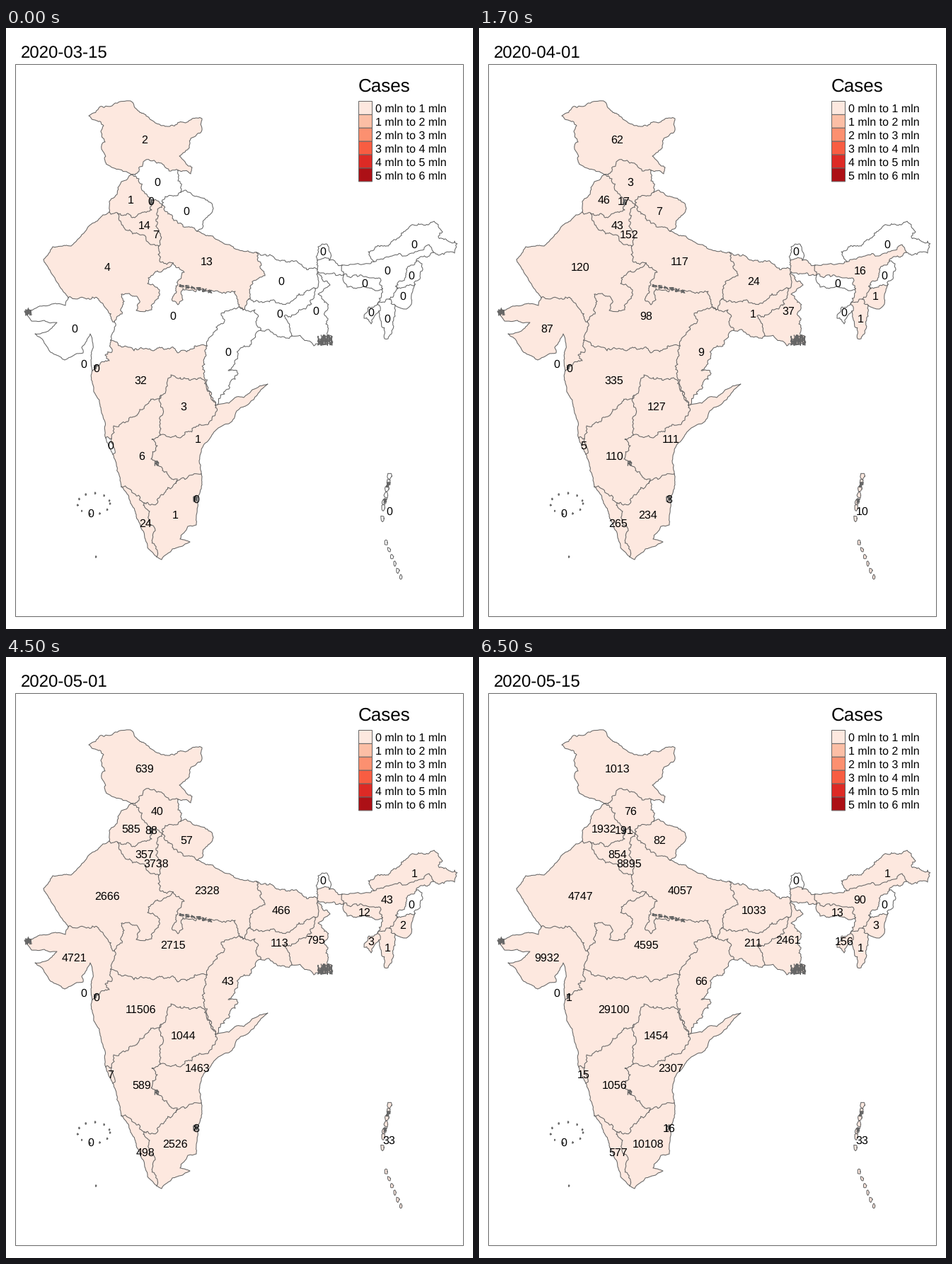
Animation, 660 px wide and 849 px high, one loop 8000 ms. Source, as a matplotlib script:

```python
import math
import numpy as np
import matplotlib.pyplot as plt
from matplotlib.animation import FuncAnimation
from matplotlib.patches import Polygon, Rectangle

W, H, DPI = 660, 849, 100
PX = 72 / DPI
LINE, PINK = "#666666", "#FDE8DF"
REDS = [PINK, "#FCBEA5", "#FC9070", "#F85D42", "#DD2A25", "#AC1016"]
DATES = ["2020-03-15", "2020-04-01", "2020-04-15", "2020-05-01", "2020-05-15"]
STEPS_PER_DATE = 4  # half-second steps; the loop opens on the last one of a date
COAST, RIDGE, BORDER = 0.06, 0.12, 0.2  # raggedness of a line

plt.rcParams.update({"font.family": "Liberation Sans", "text.hinting": "none",
                     "text.hinting_factor": 1})
rng = np.random.default_rng(7)
fig = plt.figure(figsize=(W / DPI, H / DPI), dpi=DPI, facecolor="white")
ax = fig.add_axes([0, 0, 1, 1])
ax.set(xlim=(0, W), ylim=(H, 0))
ax.axis("off")

arcs, states = {}, []


def roughen(p, q, rough):
    """Midpoint displacement of one segment, without its end point."""
    dx, dy = q[0] - p[0], q[1] - p[1]
    length = math.hypot(dx, dy)
    if length < 3:
        return [p]
    limit = min(0.35, 2.5 / length)
    k = np.clip(rng.normal(0, rough), -limit, limit)
    mid = ((p[0] + q[0]) / 2 - dy * k, (p[1] + q[1]) / 2 + dx * k)
    return roughen(p, mid, rough) + roughen(mid, q, rough)


def arc(name, rough, *points):
    line = [r for p, q in zip(points, points[1:]) for r in roughen(p, q, rough)]
    arcs[name] = line + [points[-1]]
    ax.plot(*zip(*arcs[name]), color=LINE, lw=1.05 * PX, zorder=3,
            solid_joinstyle="round")


def ring(names):
    """Join arcs end to end, flipping each one where needed."""
    parts = [arcs[n] for n in names.split()]
    pts = list(parts[0])
    if len(parts) > 1:
        gap = lambda p: min(math.dist(p, parts[1][i]) for i in (0, -1))
        if gap(pts[0]) < gap(pts[-1]):
            pts.reverse()
    for part in parts[1:]:
        flip = math.dist(pts[-1], part[-1]) < math.dist(pts[-1], part[0])
        pts += part[::-1] if flip else part
    return pts


def label(x, y, size, text="", ha="left"):
    return ax.text(x, y, text, size=size * PX, ha=ha, va="baseline", zorder=6)


def state(x, y, counts, *rings):
    patches = [ax.add_patch(Polygon(ring(r), ec="none", zorder=1)) for r in rings]
    states.append((counts.split(), patches, label(x, y + 5.6, 15.7, ha="center")))


def islands(prefix, centers, size):
    """Small irregular blobs, taller than wide; returns their arc names."""
    for i, (x, y) in enumerate(centers):
        r = size * rng.uniform(0.6, 1.1, 9)
        r[-1] = r[0]
        t = np.linspace(0, 2 * math.pi, 9)
        arc(f"{prefix}{i}", COAST, *zip(x + 0.6 * r * np.cos(t), y + r * np.sin(t)))
    return [f"{prefix}{i}" for i in range(len(centers))]


def scribble(x, y, w, h):
    """Dense tangle of creeks or tiny enclaves."""
    n = int(8 + w * h / 4)
    ax.plot(x + w * rng.uniform(-0.5, 0.5, n), y + h * rng.uniform(-0.5, 0.5, n),
            color=LINE, lw=PX, zorder=3)


# Points where three borders, or a border and the outline, meet
JK_W, JK_E, HP_PB, HP_UK = (179, 207), (243, 201), (204, 241), (247, 232)
UK_HR, UK_UP, PB_HR, PB_RJ = (221, 250), (270, 287), (158, 262), (146, 260)
HR_UP, UP_MP, UP_BR, BR_JH = (216, 308), (236, 332), (354, 317), (343, 383)
UP_CG, RJ_GJ, GJ_RJ, GJ_MH = (335, 398), (88, 381), (153, 415), (148, 441)
MH_GJ, MP_CG, CG_TG, MH_KA = (122, 484), (284, 449), (296, 533), (219, 519)
GA_MH, GA_IN, GA_KA, KA_AP = (141, 579), (149, 580), (151, 602), (218, 575)
AP_TN, TN_AP, KA_KL, KA_TN = (240, 643), (276, 630), (163, 648), (195, 671)
CAPE, CG_JH, JH_SEA, BR_WB = (213, 747), (360, 427), (404, 435), (437, 368)
WB_BR, SK_W, SK_E, WB_AS = (440, 341), (440, 328), (457, 328), (475, 335)
ML_W, ML_E, AS_AR, AR_AS = (477, 349), (532, 368), (520, 330), (604, 317)
NL_N, NL_MN, MN_E, MN_MZ = (580, 329), (551, 365), (578, 362), (550, 392)
MZ_N, TR_N, TR_MZ = (542, 383), (527, 387), (527, 400)

# North
arc("jk_out", RIDGE, JK_W, (143, 193), (135, 171), (140, 161), (134, 146), (138, 138),
    (117, 124), (133, 111), (176, 103), (185, 115), (225, 139), (250, 133), (277, 128),
    (277, 144), (261, 156), (260, 163), (245, 181), (263, 197), (261, 206), JK_E)
arc("jk_hp", BORDER, JK_W, (194, 189), (213, 191), JK_E)
arc("hp_out", BORDER, JK_E, (243, 216), HP_UK)
arc("hp_uk", BORDER, HP_UK, (225, 238), UK_HR)
arc("hp_hr", BORDER, HP_PB, UK_HR)
arc("hp_pb", BORDER, JK_W, (188, 213), (192, 229), HP_PB)
arc("pb_out", RIDGE, JK_W, (163, 217), (157, 235), (149, 241), PB_RJ)
arc("pb_rj", BORDER, PB_RJ, PB_HR)
arc("pb_hr", BORDER, PB_HR, (182, 268), (206, 257), HP_PB)
arc("hr_rj", BORDER, PB_HR, (160, 272), (179, 291), (193, 292), (207, 306), HR_UP)
arc("hr_up", BORDER, UK_HR, (212, 270), HR_UP)
arc("uk_out", RIDGE, HP_UK, (254, 229), (277, 240), (293, 255), (283, 268), UK_UP)
arc("uk_up", BORDER, UK_HR, (224, 258), (243, 276), UK_UP)
arc("up_out", RIDGE, UK_UP, (322, 311), UP_BR)
arc("up_br", BORDER, UP_BR, (361, 335), (366, 350), (345, 365), BR_JH)
arc("up_jh", BORDER, BR_JH, UP_CG)
arc("up_mp", BORDER, UP_MP, (252, 345), (243, 362), (236, 386), (243, 391), (250, 384),
    (250, 368), (324, 372), (328, 388), UP_CG)
arc("up_rj", BORDER, HR_UP, (219, 331), UP_MP)

# West and centre
arc("rj_out", COAST, PB_RJ, (137, 264), (92, 308), (66, 309), (53, 327), (69, 353),
    RJ_GJ)
arc("rj_mp", BORDER, UP_MP, (201, 353), (200, 361), (217, 370), (206, 398), (184, 399),
    (185, 379), (163, 376), (164, 404), GJ_RJ)
arc("rj_gj", BORDER, RJ_GJ, (122, 380), (140, 395), GJ_RJ)
arc("gj_out", COAST, RJ_GJ, (84, 392), (70, 389), (26, 400), (36, 414), (72, 416),
    (60, 428), (41, 432), (62, 457), (83, 469), (109, 459), (107, 451), (119, 432),
    (121, 457), MH_GJ)
arc("gj_mp", BORDER, GJ_RJ, GJ_MH)
arc("gj_mh", BORDER, GJ_MH, (150, 457), (140, 462), (146, 470), MH_GJ)
arc("mp_mh", BORDER, GJ_MH, (181, 456), (234, 451), (243, 459), MP_CG)
arc("mp_cg", BORDER, UP_CG, (304, 403), (309, 412), (293, 430), MP_CG)
arc("cg_mh", BORDER, MP_CG, (281, 475), (284, 505), CG_TG)
arc("cg_jh", BORDER, UP_CG, (352, 398), CG_JH)
arc("cg_out", BORDER, CG_JH, (330, 454), (314, 484), (328, 488), (309, 517), CG_TG)
arc("mh_out", COAST, MH_GJ, (124, 509), GA_MH)
arc("mh_ga", BORDER, GA_MH, GA_IN)
arc("mh_ka", BORDER, GA_IN, (152, 562), (182, 549), MH_KA)
arc("mh_tg", BORDER, MH_KA, (233, 490), (277, 496), CG_TG)

# South
arc("ga_out", COAST, GA_MH, GA_KA)
arc("ga_ka", BORDER, GA_IN, GA_KA)
arc("ka_out", COAST, GA_KA, KA_KL)
arc("ka_tg", BORDER, MH_KA, KA_AP)
arc("ka_ap", BORDER, KA_AP, (206, 581), (214, 590), (205, 609), (221, 625), (242, 637),
    AP_TN)
arc("ka_tn", BORDER, AP_TN, (220, 659), (213, 672), KA_TN)
arc("ka_kl", BORDER, KA_TN, KA_KL)
arc("tg_ap", BORDER, KA_AP, (252, 575), (291, 554), CG_TG)
arc("ap_out", COAST, CG_TG, (315, 530), (326, 521), (336, 522), (348, 511), (370, 503),
    (350, 525), (326, 541), (315, 559), (300, 565), (278, 592), (274, 605), TN_AP)
arc("ap_tn", BORDER, AP_TN, TN_AP)
arc("tn_out", COAST, TN_AP, (277, 645), (269, 665), (269, 702), (257, 704), (246, 722),
    (260, 726), (235, 736), (220, 751), CAPE)
arc("tn_kl", BORDER, KA_TN, (211, 710), CAPE)
arc("kl_out", COAST, KA_KL, (184, 690), (200, 734), CAPE)

# East
arc("br_out", BORDER, UP_BR, (390, 328), (418, 334), WB_BR)
arc("br_wb", BORDER, WB_BR, BR_WB)
arc("br_jh", BORDER, BR_JH, (402, 387), (423, 373), BR_WB)
arc("jh_wb", BORDER, BR_WB, (432, 390), (393, 407), JH_SEA)
arc("jh_out", BORDER, CG_JH, (386, 436), JH_SEA)
arc("wb_out", BORDER, JH_SEA, (435, 449), (460, 447), (455, 394), (441, 376),
    (458, 363), (440, 345), (464, 346), ML_W)
arc("wb_as", BORDER, ML_W, WB_AS)
arc("wb_top", BORDER, WB_AS, SK_E)
arc("wb_sk", BORDER, SK_E, SK_W)
arc("wb_np", BORDER, SK_W, WB_BR)
arc("sk_out", RIDGE, SK_W, (441, 309), (453, 305), SK_E)

# North-east
arc("as_bt", RIDGE, WB_AS, AS_AR)
arc("as_ar", RIDGE, AS_AR, (562, 322), (598, 306), AR_AS)
arc("as_tip", BORDER, AR_AS, NL_N)
arc("ar_out", BORDER, AS_AR, (512, 316), (522, 309), (546, 301), (580, 279), (605, 273),
    (617, 288), (611, 294), (634, 301), (634, 318), AR_AS)
arc("as_nl", BORDER, NL_N, (565, 347), NL_MN)
arc("nl_out", BORDER, NL_N, (588, 333), MN_E)
arc("nl_mn", BORDER, MN_E, NL_MN)
arc("as_mn", BORDER, NL_MN, MZ_N)
arc("mn_out", COAST, MN_E, (573, 390), (566, 397), MN_MZ)
arc("mn_mz", BORDER, MN_MZ, MZ_N)
arc("as_mz", BORDER, MZ_N, TR_N)
arc("mz_out", RIDGE, MN_MZ, (550, 407), (540, 439), (535, 439), TR_MZ)
arc("mz_tr", BORDER, TR_N, TR_MZ)
arc("tr_out", BORDER, TR_N, (513, 394), (506, 410), (516, 418), TR_MZ)
arc("as_bd", BORDER, TR_N, ML_E)
arc("as_ml", BORDER, ML_E, (530, 357), (508, 351), ML_W)
arc("ml_out", RIDGE, ML_W, (482, 366), ML_E)

# Islands: two chains and a loose ring of atolls
north = [(542 - 2 * i + i % 2, 633 + 9 * i) for i in range(6)] + [(532, 693)]
south = [(537 + 4.2 * i, 727 + 9.8 * i) for i in range(5)] + [(558, 775)]
angles = np.arange(0, 2 * math.pi, 0.6)
atolls = [(124 + 23 * math.cos(a), 672 + 15 * math.sin(a)) for a in angles]
chain = islands("n", north, 5) + islands("s", south, 4)
reefs = islands("r", atolls + [(127, 747)], 1.4)

# Creeks, delta, ravines and enclaves
scribble(32, 401, 9, 11)
for x in np.arange(442, 461, 3):
    scribble(x, 441, 3, 15)
for x in np.arange(248, 290, 8):
    scribble(x, 364 + (x - 248) / 5, 7, 5)
for x, y in [(213, 615), (206, 246), (127, 480), (268, 665), (540, 645), (536, 668)]:
    scribble(x, y, 6, 9)

state(195.5, 157, "2 62 300 639 1013", "jk_out jk_hp")
state(214, 217, "0 3 35 40 76", "jk_hp hp_out hp_uk hp_hr hp_pb")
state(176.5, 242, "1 46 186 585 1932", "pb_out hp_pb pb_hr pb_rj")
state(205, 244.5, "0 17 21 88 191")
state(255, 258, "0 7 37 57 82", "hp_uk uk_out uk_up")
state(195.5, 278.5, "14 43 204 357 854", "pb_hr hp_hr hr_up hr_rj")
state(212, 291.5, "7 152 1578 3738 8895")
state(143.5, 337, "4 120 1076 2666 4747",
      "rj_out pb_rj hr_rj up_rj rj_mp rj_gj")
state(284, 329.5, "13 117 735 2328 4057",
      "hr_up uk_up up_out up_br up_jh up_mp up_rj")
state(388.5, 357.5, "0 24 72 466 1033", "br_out br_wb br_jh up_br")
state(448, 315, "0 0 0 0 0", "sk_out wb_sk")
state(577, 305, "0 0 1 1 1", "ar_out as_ar")
state(572.5, 349, "0 0 0 0 0", "as_nl nl_out nl_mn")
state(560.5, 378.5, "0 1 2 2 3", "nl_mn mn_out mn_mz as_mn")
state(539, 410.5, "0 1 1 1 1", "mn_mz mz_out mz_tr as_mz")
state(516, 401, "0 0 2 3 156", "tr_out mz_tr")
state(506.5, 360.5, "0 0 7 12 13", "as_ml ml_out")
state(538.5, 342.5, "0 16 33 43 90",
      "wb_as as_bt as_ar as_tip as_nl as_mn as_mz as_bd as_ml")
state(437.5, 399.5, "0 37 213 795 2461",
      "wb_out wb_as wb_top wb_sk wb_np br_wb jh_wb")
state(387, 403, "0 1 28 113 211", "br_jh jh_wb jh_out cg_jh up_jh")
state(314, 457, "0 9 33 43 66", "cg_jh cg_out cg_mh mp_cg")
state(236, 406, "0 98 938 2715 4595", "rj_mp up_mp mp_cg mp_mh gj_mp")
state(96.5, 424.5, "0 87 766 4721 9932", "gj_out gj_mh gj_mp rj_gj")
state(110, 474, "0 0 0 0 0")
state(127.5, 480.5, "0 0 0 0 1")
state(190.5, 497.5, "32 335 2916 11506 29100",
      "mh_out gj_mh mp_mh cg_mh mh_tg mh_ka mh_ga")
state(251, 534, "3 127 650 1044 1454", "mh_tg tg_ap ka_tg")
state(271, 580.5, "1 111 525 1463 2307", "tg_ap ap_out ap_tn ka_ap")
state(192, 604, "6 110 279 589 1056",
      "mh_ka ka_tg ka_ap ka_tn ka_kl ka_out ga_ka")
state(148, 589, "0 5 7 7 15", "ga_out ga_ka mh_ga")
state(120, 685, "0 0 0 0 0", *reefs)
state(197, 699.5, "24 265 388 498 577", "ka_kl tn_kl kl_out")
state(239, 687, "1 234 1242 2526 10108", "ka_tn ap_tn tn_out tn_kl")
state(269, 665.5, "0 3 7 8 16")
state(541.5, 682.5, "0 10 11 33 33", *chain)

# Frame, heading and legend; snapping would move half-pixel edges
ax.add_patch(Rectangle((13.5, 51.5), 633, 780, fill=False, ec=LINE, lw=PX,
                       snap=False))
title = label(20.5, 42.5, 23.6)
label(497.5, 90, 25.8, "Cases")
for i, color in enumerate(REDS):
    top = 103.5 + 18.9 * i
    ax.add_patch(Rectangle((498.5, top), 19, 18.9, fc=color, ec=LINE, lw=PX,
                           snap=False))
    label(522.5, top + 15.6, 15.8, f"{i} mln to {i + 1} mln")


def draw(step):
    k = (step + STEPS_PER_DATE - 1) // STEPS_PER_DATE
    title.set_text(DATES[k])
    for counts, patches, text in states:
        text.set_text(counts[k])
        for patch in patches:
            patch.set_facecolor("white" if counts[k] == "0" else PINK)


anim = FuncAnimation(fig, draw, frames=16, interval=500, repeat=True,
                     repeat_delay=0, blit=False)
plt.show()
```
